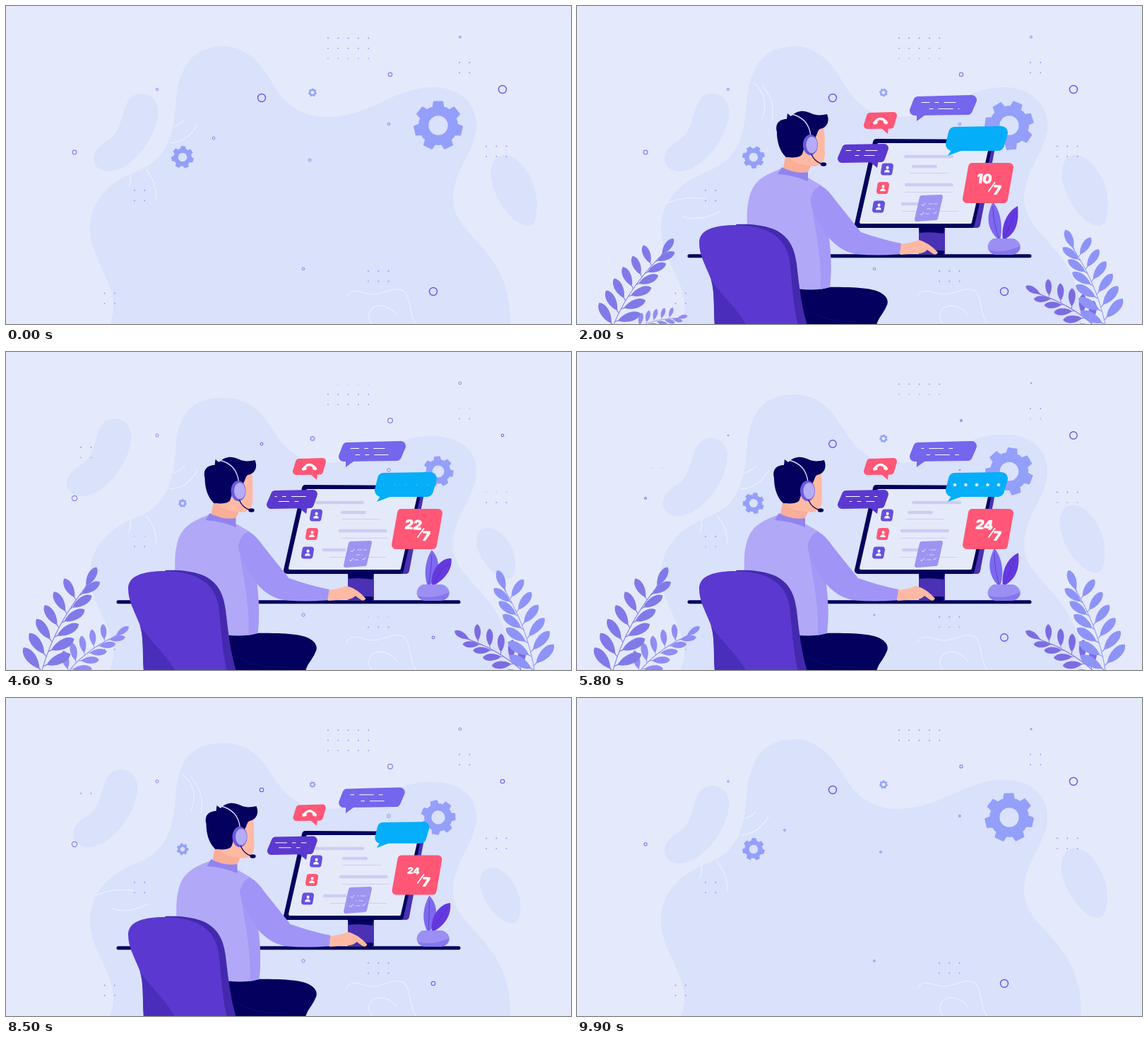
Write an HTML page that moves like this. It is 800 px wide and 450 px high and loops after 10 s.

```html
<!DOCTYPE html>
<html lang="en">
<head>
<meta charset="utf-8">
<title>Support desk</title>
<style>
html, body { margin: 0; width: 100%; height: 100%; overflow: hidden; background: #e4eafb }
svg { display: block; width: 100%; height: 100% }
text { font: 900 18.5px Inter, "Open Sans", sans-serif; fill: #fff; stroke: #fff; stroke-width: .5 }
</style>
</head>
<body>
<svg id="stage" viewBox="0 0 800 450"></svg>
<script>
const NAVY = '#03005e', VIOLET = '#5b39d0', PINK = '#ff5775', SKIN = '#fdb9a3';
const { PI, sin, cos, min, max, round } = Math;
const stage = document.getElementById('stage');

// Timing
const clamp = u => max(0, min(1, u));
const life = (t, a, b, c, d) =>
  min(1 - (1 - clamp((t - a) / (b - a))) ** 3, 1 - clamp((t - c) / (d - c)) ** 3);
const wave = (p, peak) => cos(2 * PI * (p - peak));
function track(t, keys) {
  const i = max(1, keys.findIndex(k => k[0] > t));
  const [a, x] = keys[i - 1], [b, y] = keys[i];
  return x + (y - x) * (t - a) / (b - a);
}

// Drawing
const path = (d, fill) => `<path d="${d}" fill="${fill}"/>`;
const line = (d, color, width, extra = '') =>
  `<path d="${d}" fill="none" stroke="${color}" stroke-width="${width}" stroke-linecap="round" ${extra}/>`;
const oval = (x, y, rx, ry, fill) => `<ellipse cx="${x}" cy="${y}" rx="${rx}" ry="${ry}" fill="${fill}"/>`;
const group = (transform, body) => `<g transform="${transform}">${body}</g>`;
const grow = (x, y, k, body) => k > .005 ? group(`translate(${x} ${y}) scale(${k}) translate(${-x} ${-y})`, body) : '';
const slab = (points, r, fill) =>
  `<polygon points="${points}" fill="${fill}" stroke="${fill}" stroke-width="${2 * r}" stroke-linejoin="round"/>`;
const ring = (x, y, r, color, width) => r > .3
  ? `<circle cx="${x}" cy="${y}" r="${r}" fill="none" stroke="${color}" stroke-width="${width}"/>` : '';
const digits = (x, y, label) =>
  `<text transform="translate(${x} ${y}) rotate(3) skewX(-5)" text-anchor="middle">${label}</text>`;

function gear(x, y, r, hole, turn) {
  const pts = [];
  for (let i = 0; i < 7; i++)
    for (const [a, k] of [[-.28, .76], [-.18, .97], [.18, .97], [.28, .76], [.45, .77]]) {
      const w = (i / 7 + turn) * 2 * PI + a;
      pts.push((sin(w) * k * r).toFixed(2) + ' ' + (-cos(w) * k * r).toFixed(2));
    }
  const h = hole * r;
  return `<path transform="translate(${x} ${y})" fill="#949ffa" stroke="#949ffa" stroke-width="${r * .06}"
    stroke-linejoin="round" fill-rule="evenodd"
    d="M${pts.join('L')}ZM${h} 0A${h} ${h} 0 1 0 ${-h} 0A${h} ${h} 0 1 0 ${h} 0Z"/>`;
}

function dots(x, y, cols, rows, p) {
  let out = '';
  for (let r = 0; r < rows; r++) {
    const alpha = clamp(.5 + 2.2 * wave(p, .04 + .1 * r));
    for (let c = 0; c < cols; c++)
      out += `<circle cx="${x + c * 14.3}" cy="${y + r * 14.4}" r=".9" fill="#8f95f0" opacity="${alpha}"/>`;
  }
  return out;
}

function sprig(x, y, angle, len, bend, n, size, color, k) {
  if (k < .01) return '';
  let out = line(`M0 0Q0 ${-len / 2} ${bend} ${-len}`, color, 1);
  const leaf = (u, turn, s) => group(
    `translate(${bend * u * u} ${-len * u}) rotate(${turn}) scale(${s})`,
    path('M-.01 0L-.02 -.15C-.2 -.4 -.24 -.85 0 -1C.24 -.85 .2 -.4 .02 -.15L.01 0Z', color));
  for (let i = 0; i < n; i++) {
    const u = .04 + .88 * i / n, s = size * (1 - .25 * u);
    out += leaf(u, -52 + 12 * u, s) + leaf(u + .05, 52 - 12 * u, s);
  }
  out += leaf(.9, bend / len * 60, size * .8);
  return group(`translate(${x} ${y}) rotate(${angle + (1 - k) * (angle > 0 ? 70 : -70)}) scale(${k})`, out);
}

function backdrop(t, p) {
  const m = (1 - cos(2 * PI * (p < .5 ? p : min(1, .5 + (p - .5) * 1.08)))) / 2;
  const n = (1 - cos(2 * PI * p)) / 2, s = sin(PI * p), tint = '#d9e1fb';
  const top = 57 + 9.5 * s, hump = 115 + 5 * s, hx = 605 - 5 * s;
  let out = path(`M147 450C168 400 119 365 119 315C119 275 148 248 185 234C232 215 237 180 241 130
    C246 80 270 ${top} 308 ${top}C345 ${top} 365 88 380 114C397 140 418 157 ${455 - 6 * s} 157
    C515 157 550 ${hump} ${hx} ${hump}C642 ${hump} 666 138 666 168C666 205 633 232 633 272C633 330 716 340 714 450Z`, tint);
  out += group(`translate(${-58 * m} ${-46 * m})`, path(`M192 124C208 124 217 138 215 155C211 190 176 234 145 234
    C130 234 121 222 125 210C130 196 145 192 155 180C168 163 164 124 192 124Z`, tint));
  out += group(`translate(${719 - 39 * n} ${262 + 36 * n}) scale(${1 - .24 * n} ${1 - .43 * n}) translate(-719 -262)`,
    path('M706 211C690 211 685 228 687 245C692 275 718 311 739 311C751 311 753 290 751 270C747 240 725 211 706 211Z', tint));

  const late = (t > 1 && t < 3.3) || (t > 6.5 && t < 9);
  const strokes = late
    ? ['M250 108Q274 128 262 160', 'M262 112Q282 135 276 162', 'M126 280Q150 268 182 273', 'M150 298Q175 306 202 291']
    : ['M253 161Q248 167 238 171', 'M271 168Q256 193 232 194', 'M176 237Q178 246 174 255', 'M198 231Q213 248 213 273'];
  strokes.push('M482 411C490 395 505 409 522 408C540 406 550 396 563 403C574 411 570 438 582 452',
    'M520 452C508 440 515 424 530 424Q545 425 553 437');
  out += strokes.map(d => line(d, '#e8eefd', 1.5)).join('');

  for (const [x, y, c, r] of [[456, 45.5, 5, 3], [642, 80, 2, 2], [680, 198.5, 3, 2], [182, 261, 2, 2], [139.5, 406.5, 2, 2], [513, 375, 3, 2]])
    out += dots(x, y, c, r, p);
  out += dots(106, 135, 2, 3, p + .6);
  const big = 1 - m;
  for (const [x, y] of [[362, 130], [703, 118], [605, 404]])
    out += ring(x, y, 5.5 * big, '#6259e6', .7 + .7 * big);
  const small = clamp(.6 + .62 * wave(p, .2));
  for (const [x, y, r] of [[544, 97, 3.4], [97, 207, 3.6], [643, 44, 1.9], [214, 118, 2.1], [294, 187, 2.4], [430, 218, 2.4], [421, 372, 2.2], [542, 167, 2.3]])
    out += ring(x, y, r * small, '#8083ee', r > 3 ? 1.2 : .9);
  const turn = t / 35;
  return out + gear(612, 169, 35 * (1 - .58 * m), .42, turn)
    + gear(250, 214, 16 * (1 - .95 * m), .42, turn + .01) + gear(434, 122.5, 6 * (1 - .5 * m), .45, turn);
}

function avatar(x, y, color) {
  return group(`translate(${x} ${y})`, slab('-3.5,-4.5 5,-4.5 3.5,4.5 -5,4.5', 4, color)
    + oval(.6, -2.2, 2, 2.2, '#fff') + path('M-4 4.5Q-3.6 .8 0 .8Q3.6 .8 3.8 4.5Z', '#fff'));
}

function monitor(t, p) {
  const bar = (x, y, w, h = 4.5) => line(`M${x + h / 2} ${y}h${w - h}`, '#cdcdf3', h);
  return path('M484 312H521V351H484Z', '#4b31b4') + path('M484 312H521L519 322Q500 319 485 321Z', NAVY)
    + slab('426,194 588,195 566,309 400,309', 5, '#4b31b4')
    + slab('424,193 584,194 558,309 398,309', 5, NAVY)
    + slab('427,196 582,196 557,306 402,306', 2, '#e5eafb')
    + bar(458 + 21 * wave(p, .79), 213, 70) + bar(468 + 10 * wave(p, .15), 227, 36)
    + bar(468 + 9 * wave(p, .2), 236.5, 55, 1) + bar(462 + 10 * wave(p, .22), 253, 69)
    + bar(464 + 12 * wave(p, .25), 263.5, 66, 1) + bar(453 + 7 * wave(p, .9), 280, 34)
    + bar(456 + 6 * wave(p, .1), 290.5, 80, 1)
    + avatar(439, 231, '#6650de') + avatar(433, 257.5, PINK) + avatar(427, 284, '#6650de')
    + slab('488,271 515,270 508,300 481,302', 3, '#9d94f2')
    + line('M498 280h12M496 287h9M493 294h8', '#d6d3fb', 1, `stroke-dasharray="7 3" stroke-dashoffset="${-t * 4}"`)
    + line('M488 281l2 2 3-4M486 294l2 2 3-4M505 293l1 1 3-3', '#eceafe', .9);
}

function plant(p) {
  const m = (1 - cos(2 * PI * p)) / 2, a = 589 + 21 * m, b = 624 + 10 * m;
  return path(`M597 331C${a - 13} 312 ${a - 7} 291 ${a} ${277 + 5 * m}C${a + 12} 292 ${a + 14} 315 599 331Z`, '#7d69ef')
    + path(`M603 331C600 310 ${b - 15} 291 ${b} ${283 + 14 * m}C${b + 2} 306 622 322 604 331Z`, '#6439df')
    + line(`M598 331Q${a} 306 ${a} ${284 + 5 * m}M604 331Q614 309 ${b - 4} ${291 + 12 * m}`, '#4f30c6', .7)
    + path('M590 329H618C632 334 632 352 612 352H596C578 352 578 334 590 329Z', '#9b8ff4')
    + path('M583 345Q603 351 627 340Q627 352 612 352H596Q586 352 583 345Z', '#8577ec');
}

function star(x, y, r) {
  const pts = Array.from({ length: 10 }, (_, i) => {
    const k = i % 2 ? r * .45 : r, a = i * PI / 5;
    return `${x + k * sin(a)},${y - k * cos(a)}`;
  });
  return `<polygon points="${pts.join(' ')}" fill="#fff"/>`;
}

function bubbles(t) {
  const pop = (start, end = 8.35) => life(t, start, start + .5, end, end + .6);
  const words = (d, speed) => line(d, '#fff', 1, `stroke-dasharray="20 8 5 8" stroke-dashoffset="${-t * speed}"`);
  let out = grow(483, 162, pop(1.1), slab('483,135 559,133 553,147 478,148', 7, '#7466ed')
    + path('M481 152V163L496 152Z', '#7466ed') + words('M488 136.5H536', 16) + words('M495 145.5H541', -12));
  out += grow(440, 180, pop(1), slab('415,156 448,155 444,168.5 411,169', 5, PINK)
    + path('M430 172L440 181L441 171Z', PINK)
    + line('M421.5 165Q429 154.5 437.5 164', '#fff', 3.4) + line('M421 165.5l2.5-.6M436 164.6l2 .6', '#fff', 4.2));
  out += grow(425, 229, pop(1.2), slab('381,202 435,201 430,215 375,216', 6, VIOLET)
    + path('M413 219L425 229L427 218Z', VIOLET) + words('M381 204.5H425', 14) + words('M386 211.5H421', -10));
  let stars = '';
  const size = 5.6 * life(t, -1, 0, 7.7, 8.3) * clamp((t - 4.3) / 2.6);
  if (size > .1) for (let i = 0; i < 5; i++) stars += star(535 + i * 15.5, 188, size);
  out += grow(525, 211, pop(1.1, 8.2), slab('535,180 601,179 596,196 531,196', 9, '#05aef9')
    + path('M531 202L525 212L549 203Z', '#05aef9') + stars);
  const hours = round(24 * min(1, t / 5));
  return out + grow(582, 251, pop(1), slab('560,228 612,228 604,273 552,273', 6, PINK)
    + grow(577, 244, life(t, .9, 1.2, 8.1, 8.7), digits(576, 251, hours))
    + line('M591.5 250L583 262', '#fff', 1.8) + digits(594, 267, 7));
}

const trousers = path('M312 401C340 397 385 397 410 400C435 403 444 415 438 425C434 435 426 442 424 452H325Z', NAVY)
  + line('M325 430Q350 447 395 446', '#0c0a78', 1);

const upperBody =
  path('M290 230L327 243L346 254C352 290 364 350 358 398Q335 404 313 400H250Q236 300 243 275C247 250 262 240 290 230Z', '#b1a8f8')
  + path('M330 270C338 320 347 360 345 401L358 398C363 350 355 320 350 300Z', '#a499f7')
  + path('M457 337Q472 336 484 331Q499 335 511 349Q508 354 503 350L496 345Q491 351 481 350L458 352Z', SKIN)
  + path('M331 278Q331 260 345 254Q356 260 366 275L402 320Q430 330 459 336L457 351Q425 354 395 351Q372 347 355 326Q337 302 331 278Z', '#a094f7')
  + path('M297 205L292 229Q310 240 326 237L333 222Z', '#f9ae98')
  + path('M306 180L349 170C352 185 350 196 351 208C351 224 341 229 328 226Q306 224 298 211Z', SKIN)
  + path('M290 228Q308 238 327 235L327 248Q306 239 284 238Z', '#9184f0')
  + path('M283 178C280 166 287 160 297 160L298 152L303 156C312 147 322 147 332 152C340 156 348 154 354 153C358 162 355 172 344 174C340 176 340 184 337 186L331 184C322 188 322 206 318 211C312 216 300 214 296 214C286 205 283 190 283 178Z', NAVY)
  + line('M303 153Q328 158 331 184', '#d8d6fb', 1.3)
  + oval(330.5, 196.5, 10.5, 14.5, '#6d58df') + oval(332.5, 196.5, 8, 11.5, '#b5acf7')
  + line('M332 210Q337 221 347 223.5', NAVY, 1.3) + oval(349, 224, 4.2, 2.8, NAVY);

const chair =
  path('M225 309C285 307 306 325 311 365C315 400 318 425 326 452H290Z', '#4429af')
  + path('M173 335C173 316 195 310 225 310C268 311 295 325 301 360C305 395 306 425 313 452H195C193 425 196 405 189 385C181 365 173 352 173 335Z', VIOLET)
  + path('M190 388C205 410 225 425 240 452H195C193 425 195 405 190 388Z', '#4a2dba');

function scene(t) {
  const p = t / 2 % 1;
  const leaves = (a, b) => life(t, a, b, 7.7, 8.4);
  const desk = life(t, .1, .7, 9.2, 9.8) * 244;
  const sit = life(t, .2, 1.1, 8.8, 9.6);
  const lean = track(t, [[0, 0], [2, 0], [4.6, -1.5], [5.8, -4], [7.4, -9], [8.5, .5], [10.1, 0]]);
  let out = backdrop(t, p);
  out += sprig(86, 455, 38, 92, 26, 5, 31, '#918df4', leaves(1.7, 2.7));
  out += sprig(49, 458, 14, 150, 38, 6, 43, '#807ae8', leaves(1.3, 2.6));
  out += sprig(735, 455, -46, 98, -24, 5, 33, '#7c6ce2', leaves(1.2, 2.2));
  out += sprig(749, 456, -8, 134, -30, 6, 42, '#8e94f7', leaves(1.2, 2.4));
  if (desk > 1) out += line(`M${400 - desk + 3} 353.7H${400 + desk - 3}`, NAVY, 5);
  out += grow(502, 352, life(t, .3, .9, 9, 9.6), monitor(t, p));
  out += grow(604, 352, life(t, .6, 1.1, 8.9, 9.4), plant(p));
  out += bubbles(t);
  if (sit > 0) out += group(`translate(${-520 * (1 - sit)} 0)`,
    line('M507 349H517', NAVY, 6) + trousers + group(`translate(${lean} 0)`, upperBody) + chair);
  return out;
}

// The picture advances ten times a second
let shown = -1;
function frame(now) {
  const step = Math.floor(now / 100) % 100;
  if (step !== shown) {
    shown = step;
    stage.innerHTML = scene(step / 10);
  }
  requestAnimationFrame(frame);
}
frame(0);
</script>
</body>
</html>
```
